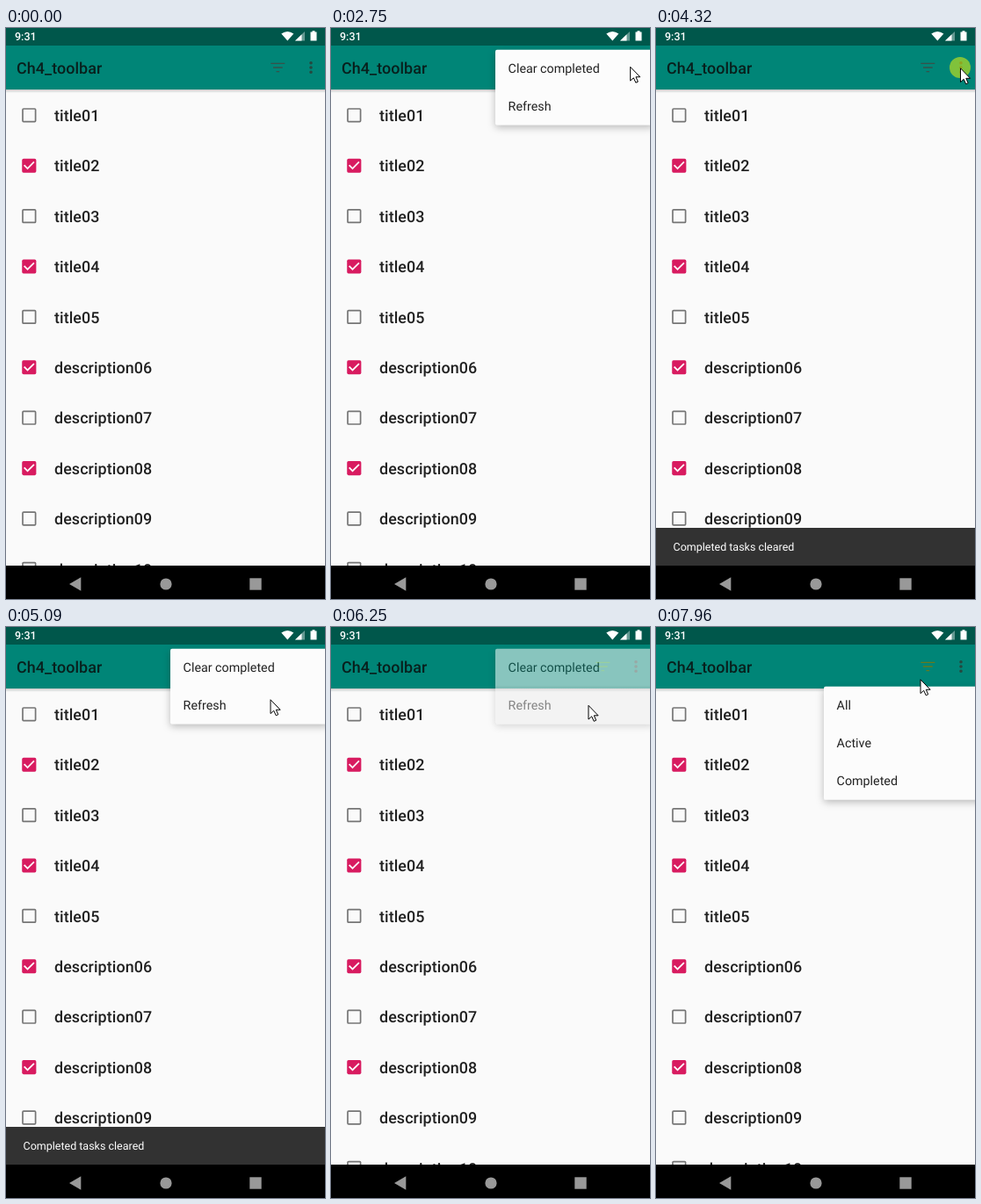
Animation, 363 px wide and 650 px high, one loop 8000 ms. Source, as an HTML page:

```html
<!DOCTYPE html>
<html lang="en">
<head>
<meta charset="utf-8">
<title>Toolbar menus</title>
<style>
  html, body { margin: 0; width: 100%; height: 100%; overflow: hidden; background: #fafafa; }
  svg { display: block; width: 100vw; height: 100vh; }
  text {
    font-family: Roboto, "Open Sans", sans-serif; font-size: 14.3px; fill: #212121;
    text-rendering: geometricPrecision;
  }
  .big { font-size: 17.9px; font-weight: 500; letter-spacing: .07px; }
  .small { font-size: 12.5px; fill: #fff; }
</style>
</head>
<body>
<svg viewBox="0 0 363 650">
  <defs>
    <linearGradient id="shade" x2="0" y2="1">
      <stop offset="0" stop-opacity=".2"/>
      <stop offset="1" stop-opacity="0"/>
    </linearGradient>
    <filter id="lift" x="-20%" y="-30%" width="140%" height="160%">
      <feDropShadow dx="0" dy="3" stdDeviation="4.5" flood-opacity=".26"/>
    </filter>
    <rect id="box" x="-7.3" y="-7.3" width="14.6" height="14.6" rx="1" fill="none" stroke="#757575" stroke-width="1.7"/>
    <g id="boxOn" transform="scale(.896) translate(-12 -12)">
      <rect x="3" y="3" width="18" height="18" rx="2" fill="#d81b60"/>
      <path d="M10 17l-5-5 1.41-1.41L10 14.17l7.59-7.59L19 8z" fill="#fff"/>
    </g>
    <clipPath id="barClip"><rect y="20" width="363" height="50"/></clipPath>
  </defs>

  <rect width="363" height="650" fill="#fafafa"/>
  <g id="list"></g>

  <rect y="70" width="363" height="4" fill="url(#shade)"/>
  <rect y="20" width="363" height="50" fill="#008577"/>
  <rect width="363" height="20" fill="#00574b"/>
  <text x="10" y="14.3" class="small" font-weight="500">9:31</text>
  <g fill="#fff">
    <path d="M313.3 6.6Q320.3 1.6 327.3 6.6L320.3 14.6z"/>
    <path d="M329 14.5H340V4z" opacity=".4"/>
    <path d="M329 14.5H336.5V7.3z"/>
    <path d="M346.5 4.6h2v-1.4h3v1.4h2v10h-7z"/>
  </g>
  <text x="12" y="52" class="big" style="fill:#08201d">Ch4_toolbar</text>
  <g clip-path="url(#barClip)">
    <circle id="tapMore" cx="347" cy="45" r="17.5"/>
    <circle id="tapFilter" cx="309.3" cy="45" r="17.5"/>
  </g>
  <path id="filterIcon" d="M301.3 40.4h16M304 45h10.7M307.5 49.6h3.6" fill="none" stroke-width="1.4"/>
  <path d="M347 39.7h0M347 45h0M347 50.3h0" stroke="#24483f" stroke-width="3.6" stroke-linecap="round"/>

  <g id="snack">
    <rect y="569" width="363" height="44" fill="#323232"/>
    <text id="snackText" x="19.5" y="595" class="small">Completed tasks cleared</text>
  </g>
  <rect y="612" width="363" height="38"/>
  <g fill="#999">
    <path d="M72 633L85.3 625.3V640.7z"/>
    <circle cx="182" cy="633" r="6.6"/>
    <rect x="277.3" y="626.3" width="13.4" height="13.4"/>
  </g>

  <g id="menus"></g>
  <circle id="halo" r="12" fill="#ff0" fill-opacity=".5"/>
  <path id="cursor" d="M.5 .8V16.6L4.2 13.3L6.7 18.8L9.2 17.7L6.8 12.3H11.6z" fill="#fff" stroke="#000" stroke-linejoin="round"/>
</svg>
<script>
const LOOP = 8000;
const $ = id => document.getElementById(id);
const set = (el, attrs) => { for (const k in attrs) el.setAttribute(k, attrs[k]); };
const clamp = v => Math.max(0, Math.min(1, v));
const ramp = (t, start, length) => clamp((t - start) / length);
const mix = (a, b, p) => a + (b - a) * p;
const smooth = p => p * p * (3 - 2 * p);
const pulse = (t, start, end) => ramp(t, start, 100) * (1 - ramp(t, end, 150));

// cubic-bezier(.4, 0, .2, 1), solved by bisection
function standard(x) {
  let lo = 0, hi = 1;
  for (let i = 0; i < 24; i++) {
    const u = (lo + hi) / 2, v = 1 - u;
    if (1.2 * u * v * v + .6 * u * u * v + u ** 3 < x) lo = u; else hi = u;
  }
  return 3 * lo * lo - 2 * lo ** 3;
}

// Pointer: each glide eases from wherever the last one ended
const enter = { start: 280, x: 290, y: 630 };
const glides = [
  { start: enter.start, end: 1050, x: 338, y: 35 },
  { start: 1130, end: 1280, x: 348, y: 41 },
  { start: 2680, end: 2900, x: 316, y: 51 },
  { start: 3700, end: 4150, x: 346, y: 45 },
  { start: 4600, end: 5250, x: 292.5, y: 88.5 },
  { start: 6450, end: 6940, x: 297.5, y: 52 },
  { start: 6960, end: 7090, x: 314, y: 50 },
  { start: 7700, end: 7960, x: 300.5, y: 59 }
];
function pointer(t) {
  return glides.reduce((from, g) => {
    const p = smooth(ramp(t, g.start, g.end - g.start));
    return { x: mix(from.x, g.x, p), y: mix(from.y, g.y, p) };
  }, enter);
}

const clicks = { open: 1660, clear: 3130, reopen: 4320, refresh: 5710, filter: 7260 };
const CLICK = 80;

const ROW = 43.15;
const menus = [
  { x: 187, y: 24, from: [347, 45], items: ["Clear completed", "Refresh"],
    shown: [
      { open: 2095, close: 3325, press: clicks.clear, row: 0 },
      { open: 4530, close: 6150, press: clicks.refresh, row: 1 }
    ] },
  { x: 191, y: 67, from: [309, 56], items: ["All", "Active", "Completed"],
    shown: [{ open: 7630, close: LOOP }] }
];

$("list").innerHTML = Array.from({ length: 10 }, (_, i) => {
  const y = 99.3 + 57.4 * i;
  const name = (i < 5 ? "title" : "description") + String(i + 1).padStart(2, "0");
  const box = i % 2 && i < 9 ? "boxOn" : "box";
  return `<use href="#${box}" transform="translate(26.3 ${y})"/>
    <text class="big" x="55" y="${y + 6.6}">${name}</text>`;
}).join("");

$("menus").innerHTML = menus.map((m, i) => {
  m.h = m.items.length * ROW;
  return `
  <clipPath id="reveal${i}"><rect/></clipPath>
  <clipPath id="row${i}"><rect x="${m.x}" width="180" height="${ROW}"/></clipPath>
  <g id="menu${i}" clip-path="url(#reveal${i})">
    <rect x="${m.x}" y="${m.y + .7}" width="180" height="${m.h - .7}" rx="2" fill="#fcfcfc" filter="url(#lift)"/>
    <circle id="press${i}" clip-path="url(#row${i})" fill-opacity=".06"/>
    ${m.items.map((s, j) => `<text x="${m.x + 14.6}" y="${m.y + 26.6 + j * ROW}">${s}</text>`).join("")}
  </g>`;
}).join("");

function drawMenu(m, i, t) {
  const s = m.shown.find(s => t >= s.open && t < s.close + 220);
  $("menu" + i).style.display = s ? "" : "none";
  if (!s) return;

  // The panel unfolds from its button; the margin leaves room for the shadow
  const p = standard(ramp(t, s.open, 250));
  const [cx, cy] = m.from;
  const left = mix(cx, m.x - 14, p), top = mix(cy, m.y - 14, p);
  set($("reveal" + i).firstElementChild, {
    x: left, y: top,
    width: mix(cx, 363, p) - left,
    height: mix(cy, m.y + m.h + 18, p) - top
  });
  set($("menu" + i), { opacity: ramp(t, s.open, 100) * (1 - ramp(t, s.close, 220)) });

  const age = t - s.press - CLICK;
  if (age > 0) {
    const at = pointer(s.press);
    set($("row" + i).firstElementChild, { y: m.y + s.row * ROW });
    set($("press" + i), { cx: at.x, cy: at.y, r: mix(20, 200, clamp(age / 280)) });
  } else set($("press" + i), { r: 0 });
}

function draw(t) {
  const swap = ramp(t, 6300, 250);
  set($("list"), { opacity: 1 - swap * (1 - swap) });

  const more = pulse(t, clicks.open + 40, 2350) + pulse(t, clicks.reopen + 40, 4900);
  set($("tapMore"), { "fill-opacity": .12 * more });
  set($("tapFilter"), { "fill-opacity": .1 * pulse(t, clicks.filter + 40, 7650) });
  set($("filterIcon"), { stroke: t < 6170 ? "#36524a" : t < 7500 ? "#279b32" : "#667a1e" });

  const up = standard(ramp(t, 3329, 250)) - standard(ramp(t, 5122, 250));
  set($("snack"), { transform: `translate(0 ${43 * (1 - up)})` });
  set($("snackText"), { opacity: ramp(t, 3410, 180) * (1 - ramp(t, 5122, 180)) });

  menus.forEach((m, i) => drawMenu(m, i, t));

  const { x, y } = pointer(t);
  const transform = `translate(${x} ${y})`;
  const down = Object.values(clicks).some(c => t >= c && t < c + CLICK);
  set($("cursor"), { transform, visibility: t < enter.start ? "hidden" : "visible" });
  set($("halo"), { transform, visibility: down ? "visible" : "hidden" });
}

const start = performance.now();
function tick() {
  draw((performance.now() - start) % LOOP);
  requestAnimationFrame(tick);
}
tick();
</script>
</body>
</html>
```
